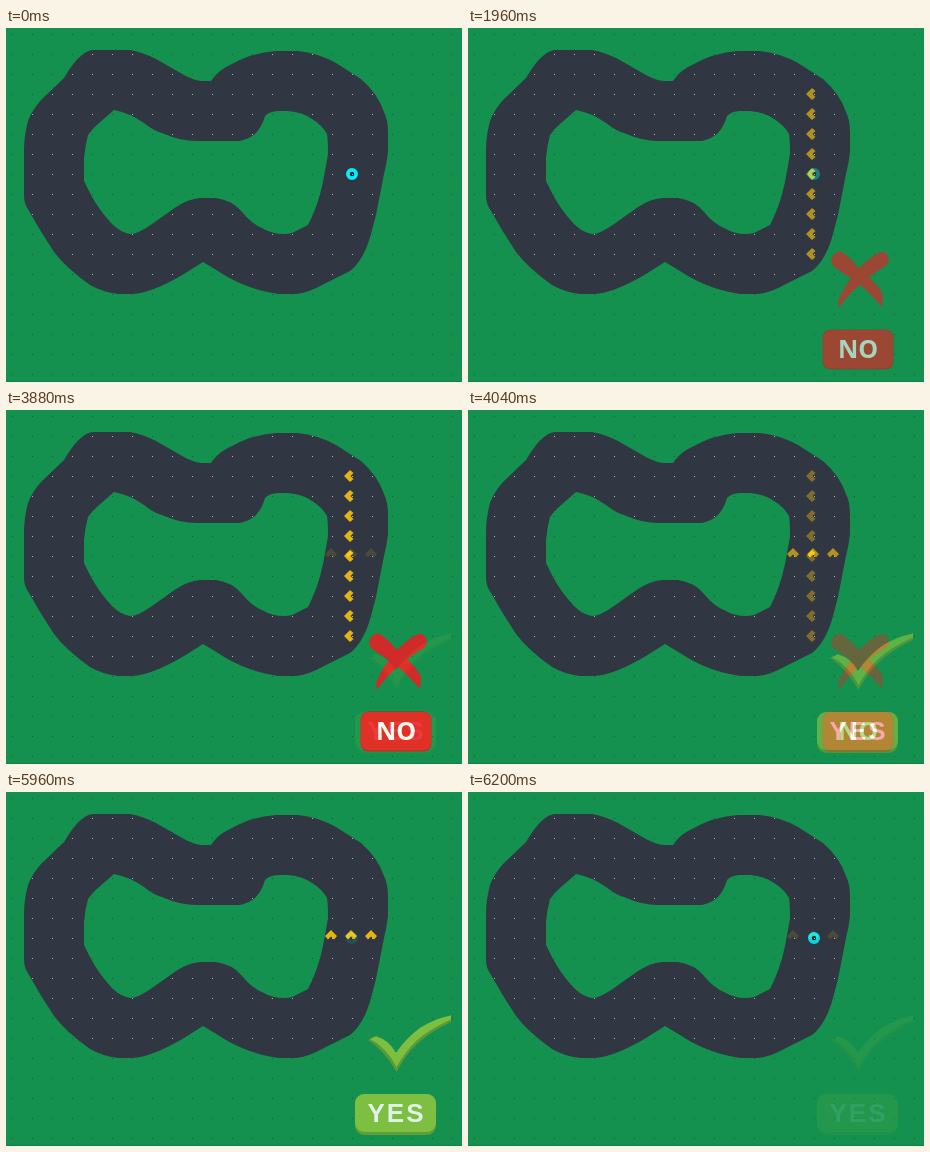
Animation, 456 px wide and 354 px high, one loop 6.24 s. Source, as an HTML page:

```html
<!DOCTYPE html>
<html lang="en">
<head>
<meta charset="utf-8">
<title>Track checkpoints</title>
<style>
  html, body { margin: 0; width: 100%; height: 100%; overflow: hidden; background: #14914f; }
  svg { display: block; }
  text { fill: #fff; font-weight: 700; }
  .no { font-family: "Open Sans", "Noto Sans", sans-serif; font-size: 25px; text-anchor: middle; }
  .yes { font-family: "Liberation Sans", Arial, sans-serif; font-size: 26px; letter-spacing: 2px; }
</style>
</head>
<body>
<svg width="456" height="354" viewBox="0 0 456 354">
  <defs>
    <pattern id="darkDots" width="20" height="20" patternUnits="userSpaceOnUse">
      <rect x="6" y="6" width="1" height="1" fill="#23553c"/>
    </pattern>
    <pattern id="lightDots" width="20" height="20" patternUnits="userSpaceOnUse">
      <rect x="6" y="6" width="1" height="1" fill="#b4b5b2"/>
    </pattern>
    <path id="road" fill-rule="evenodd" d="
      M88 22H124Q136 24 150 31L178 47Q188 52.5 196 53H205Q211 44 220 39Q246 24 270 23H292
      Q312 25 330 35L355 51Q372 66 378 84Q382 92 382 104V124Q381 134 378 146L370 187L365 206
      Q358 232 344 243L318 256Q302 265 290 266H272Q252 263 236 256Q222 250 212 243L197 234
      L178 246Q146 265 126 266H112Q96 264 84 257Q60 240 48 224Q34 203 23 183Q18 176 18 168V122
      Q18 108 22 93Q26 82 35 72L58 50Q68 33 76 27Q82 22 88 22Z
      M108 82Q124 85 138 95Q148 103 156 105Q174 113 190 113H234Q243 111 249 106Q256 99 259 88
      Q263 83.5 272 83H282Q296 84 306 91Q316 97 321 106Q322 112 322 126Q320 138 317 154
      Q312 178 302 197L290 203Q286 206 278 206Q266 206 256 200Q246 196 236 184Q226 172 210 170
      H194Q182 171 170 179L146 196Q132 206 124 206Q114 204 106 196Q92 181 84 165L78 153V130
      Q79 118 82 107Q86 101 92 96Q100 89 108 82Z"/>
    <g id="field">
      <rect width="456" height="354" fill="#14914f"/>
      <rect width="456" height="354" fill="url(#darkDots)"/>
      <rect y="353" width="456" height="1" fill="#12804a"/>
      <use href="#road" fill="#313742"/>
      <use href="#road" fill="url(#lightDots)"/>
    </g>
    <path id="chevron" fill="#ffc80a" d="M0 -6L6 0L3 3.5L0 .5L-3 3.5L-6 0Z"/>
  </defs>

  <g id="start">
    <use href="#field"/>
    <circle cx="346" cy="146" r="4.1" fill="#10202a" stroke="#00f0fa" stroke-width="3.8"/>
    <rect x="346" y="146" width="1" height="1" fill="#b4b5b2"/>
  </g>

  <g id="wrong" opacity="0">
    <use href="#field"/>
    <g id="column"></g>
    <g fill="#ed1c24">
      <path d="M363 233Q364 225 372 223Q380 227 391 240Q414 260 415 268L414 279Q402 265 390 255Q379 248 365 238Z"/>
      <path d="M412 224Q420 223 421 232L419 237Q404 246 394 255Q380 266 371 280L370 273Q375 260 386 246Q398 231 412 224Z"/>
    </g>
    <rect x="354.5" y="301.5" width="71" height="40" rx="8" fill="#c91a20"/>
    <rect x="355" y="302" width="70" height="38.5" rx="8" fill="#ed1c24"/>
    <text class="no" x="390" y="330">NO</text>
  </g>

  <g id="right" opacity="0">
    <use href="#field"/>
    <g id="row"></g>
    <path fill="#659c35" d="M362 248L370 244Q383 248 390 261Q400 246 414 236Q428 227 445 223.5V230Q425 239 411 252Q400 262 390.5 280Q378 258 362 248Z"/>
    <path fill="#8dc63f" d="M364 247L370 244.5Q383 248 390 261Q400 246 414 236Q428 227 445 223.5V227.5Q425 236 410 249Q399 260 390.5 275Q380 255 364 247Z"/>
    <rect x="349" y="303" width="81" height="40" rx="9" fill="#6a9f35"/>
    <rect x="349" y="302" width="81" height="38" rx="9" fill="#8dc63f"/>
    <text class="yes" x="361.5" y="330">YES</text>
  </g>
</svg>
<script>
  const LOOP = 6240, TICK = 40, STEPS = 8;
  const byId = id => document.getElementById(id);

  function addChevrons(id, count, place) {
    let marks = "";
    for (let i = 0; i < count; i++) {
      marks += `<use href="#chevron" transform="${place(i * 20)}"/>`;
    }
    byId(id).innerHTML = marks;
  }
  addChevrons("column", 9, d => `translate(344 ${66 + d}) rotate(-90)`);
  addChevrons("row", 3, d => `translate(${325 + d} 144)`);

  // Stepped fade from 0 to 1, already one step in at its start time
  function fade(t, start) {
    const step = Math.floor((t - start) / TICK) + 1;
    return Math.min(STEPS, Math.max(0, step)) / STEPS;
  }

  const wrong = byId("wrong"), right = byId("right");
  const origin = performance.now();

  function draw() {
    const t = (performance.now() - origin) % LOOP;
    // The middle scene stays solid beneath the last one until fully covered
    wrong.setAttribute("opacity", t < 4160 ? fade(t, 1800) : 0);
    right.setAttribute("opacity", t < 5960 ? fade(t, 3880) : 1 - fade(t, 5960));
    requestAnimationFrame(draw);
  }
  draw();
</script>
</body>
</html>
```
